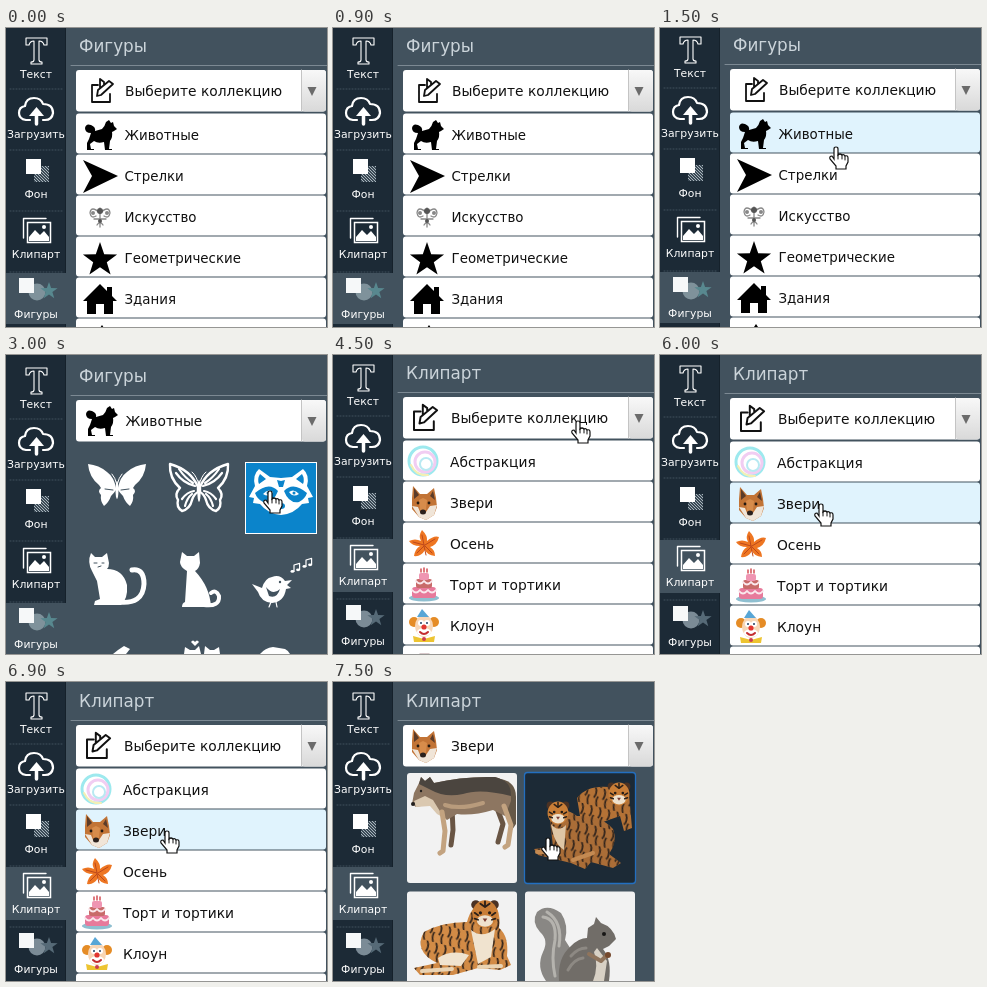
Animation, 321 px wide and 299 px high, one loop 9 s. Source, as an HTML page:

```html
<!DOCTYPE html>
<html lang="ru">
<head>
<meta charset="utf-8">
<title>Фигуры и клипарт</title>
<style>
  html, body { margin: 0; width: 100%; height: 100%; overflow: hidden; background: #42525e; }
  svg { display: block; width: 321px; height: 299px; }
  text { font-family: "DejaVu Sans", Verdana, sans-serif; font-size: 13.8px; fill: #111; }
  .compact { font-size: 13.4px; }
  .tab { font-size: 10.8px; fill: #fff; text-anchor: middle; }
  .title { font-size: 16.8px; fill: #cbd4da; }
</style>
</head>
<body>
<svg id="stage" viewBox="0 0 321 299"></svg>
<script>
const PANEL = '#42525e', SIDE = '#1c2a36', BLUE = '#0b84cb';

const shape = (d, fill = '#000') => `<path d="${d}" fill="${fill}"/>`;
const line = (d, stroke = '#fff', width = 1.5, extra = '') =>
  `<path d="${d}" fill="none" stroke="${stroke}" stroke-width="${width}" stroke-linejoin="round" stroke-linecap="round" ${extra}/>`;
const rect = (x, y, w, h, fill, extra = '') =>
  `<rect x="${x}" y="${y}" width="${w}" height="${h}" fill="${fill}" ${extra}/>`;
const dot = (x, y, r, fill, extra = '') => `<circle cx="${x}" cy="${y}" r="${r}" fill="${fill}" ${extra}/>`;
const oval = (x, y, rx, ry, fill) => `<ellipse cx="${x}" cy="${y}" rx="${rx}" ry="${ry}" fill="${fill}"/>`;
const text = (x, y, s, cls = '') => `<text x="${x}" y="${y}" class="${cls}">${s}</text>`;
const move = (x, y, content, scale = 1) => `<g transform="translate(${x} ${y}) scale(${scale})">${content}</g>`;
const mirror = half => half + `<g transform="scale(-1 1)">${half}</g>`;
const striped = (d, fill) => shape(d, fill) + shape(d, 'url(#stripes)');

function star(cx, cy, r, fill) {
  const points = Array.from({ length: 10 }, (_, i) => {
    const a = i * Math.PI / 5, k = i % 2 ? r * 0.4 : r;
    return `${(cx + k * Math.sin(a)).toFixed(1)},${(cy - k * Math.cos(a)).toFixed(1)}`;
  });
  return `<polygon points="${points.join(' ')}" fill="${fill}"/>`;
}

const defs = `<defs>
  <linearGradient id="button" x2="0" y2="1"><stop stop-color="#f8f8f8"/><stop offset="1" stop-color="#d9d9d9"/></linearGradient>
  <pattern id="hatch" width="3" height="3" patternUnits="userSpaceOnUse">
    <rect width="3" height="3" fill="#3b4a56"/><path d="M0 0L3 3" stroke="#a9b5bd"/></pattern>
  <pattern id="stripes" width="9" height="19" patternUnits="userSpaceOnUse" patternTransform="rotate(14)">
    <path d="M1 0Q5 5 2 11M6 9Q4 14 7 19" fill="none" stroke="#30231b" stroke-width="1.7"/></pattern>
</defs>`;

// Row icons are centred on the origin.
const icons = {
  pick: line('M-4-6H-10V11H8V3M-5 5L-4-1L7-10L11-7L-1 4ZM-2-3V-12L2-9V-6', '#111', 1.8),
  dog: shape('M-9-2Q-15-2-15-7Q-14-12-9-10Q-4-8-5-4L2-6Q5-9 6-13L9-15L11-12L13-13L14-9L17-6L14-4L12-3Q13 2 10 6L9 14H12V15H5L4 7Q-2 9-6 6L-10 9L-9 14H-6V15H-13V8L-11 4Z'),
  arrow: shape('M-17-16L18 0L-17 17L-8 0Z'),
  art: line('M0-9V10M0-4Q-9-12-10-4Q-9 2-4-1M0-4Q9-12 10-4Q9 2 4-1M-3 8Q0 3 3 8M-6 2H6', '#888', 1.3) +
    dot(0, -6, 3, '#555') + dot(-7, -4, 2, '#888') + dot(7, -4, 2, '#888') + dot(0, 4, 2, '#555'),
  star: star(0, 2, 18, '#000'),
  house: shape('M-17 2L0-15L7-8V-12H12V-3L17 2H13V15H4V5H-4V15H-13V2Z'),
  spike: shape('M2-15L6-9H-2Z'),
  rings: dot(-1, -1, 14, '#fff', 'stroke="#9de9ee" stroke-width="3"') +
    dot(1, 0, 10, 'none', 'stroke="#f1cdf2" stroke-width="3"') +
    dot(2, 2, 6, 'none', 'stroke="#b8e9f2" stroke-width="2"') + line('M-13 3Q-8 14 4 13', '#f3efb5', 2),
  fox: shape('M-11-17L-4-9L3-9L10-15L12-5L13 4L10 12L2 17L-5 14L-12 6L-12-5Z', '#c27436') +
    shape('M-10-15L-5-8L-10-4ZM9-12L11-3L6-7Z', '#5b3c2a') +
    shape('M-12 3L-6 4L-4 9L2 9L6 3L13 2L10 12L2 17L-5 14Z', '#f0e5d8') +
    shape('M-5-3L-1-5L3-3L2 7H-4Z', '#d78c4b') + oval(-1, 9, 3, 2.5, '#2b211d') +
    dot(-6, 0, 1.4, '#221912') + dot(5, 0, 1.4, '#221912'),
  leaf: shape('M-2-14Q4-8 3-3Q10-9 15-7Q13 1 6 3Q11 6 11 12Q3 11 1 6Q-3 13-10 12Q-9 5-4 2Q-12 2-15-3Q-9-6-3-3Q-6-8-2-14Z', '#ee7622') +
    line('M0 1L-2-9M1 1L11-5M0 1L-11-2M1 2L8 9M0 2L-7 9M0 2L2 11', '#bd481b', 1),
  cake: oval(0, 13, 15, 3.5, '#8fbfd0') + rect(-12, 2, 24, 11, '#e77a9b', 'rx="3"') +
    rect(-8, -6, 16, 9, '#c86b6a', 'rx="2"') + rect(-5, -12, 10, 7, '#ef95b2', 'rx="2"') +
    line('M-12 5Q-8 10-4 5Q0 10 4 5Q8 10 12 5M-8-4Q-4 1 0-4Q4 1 8-4', '#fae8ed', 2) +
    line('M-3-13V-16M0-13V-17M3-13V-16', '#d44f56', 1.5),
  clown: dot(-10, -4, 5, '#e58c26') + dot(10, -4, 5, '#e58c26') + oval(0, 0, 9, 11, '#f8d6b6') +
    shape('M-7-9L-2-17L5-9Z', '#58a6d6') + dot(-3, -3, 3, '#fff') + dot(3, -3, 3, '#fff') +
    dot(-3, -3, 1, '#203c61') + dot(3, -3, 1, '#203c61') + oval(0, 6, 7, 4, '#fff') +
    line('M-4 6Q0 10 4 6', '#c42d30', 2) + dot(0, 1, 2.6, '#e13632') +
    shape('M-11 10L0 13L11 10L10 16H-10Z', '#edc431') + dot(0, 13, 2, '#cc3e4e'),
  bits: line('M-4-13H5', '#cbb8ba', 1.5),
};

const shapesList = [['dog', 'Животные'], ['arrow', 'Стрелки'], ['art', 'Искусство'],
  ['star', 'Геометрические'], ['house', 'Здания'], ['spike', '']];
const clipartList = [['rings', 'Абстракция'], ['fox', 'Звери'], ['leaf', 'Осень'],
  ['cake', 'Торт и тортики'], ['clown', 'Клоун'], ['bits', '']];

function sidebar(clipart) {
  const [top, height] = clipart ? [184, 53] : [245, 51];
  const [disc, accent] = clipart ? ['#7b8b96', '#566a77'] : ['#7f929b', '#58888f'];
  return rect(0, -5, 60, 315, SIDE) + rect(59, -5, 1, 315, '#15212b') + rect(0, top, 60, height, PANEL) +
    [61, 122, 183, 244].map(y => line(`M4 ${y}H56`, '#41515d', 1, 'stroke-dasharray="1 2"')).join('') +
    line('M20 10H41V17H38Q37 13 33 13V32Q33 34 36 34V36H25V34Q28 34 28 32V13Q24 13 23 17H20Z', '#fff', 1.1) +
    line('M24 92H20Q13 91 13 85Q13 79 19 78Q20 70 28 70Q35 70 37 76Q47 76 47 85Q46 92 39 92H37', '#fff', 2.2) +
    line('M30.5 96V86', '#fff', 3.5) + shape('M23 88L30.5 79L38 88Z', '#fff') +
    rect(28, 138, 15, 16, 'url(#hatch)') + rect(20, 131, 15, 15, '#fff') +
    line('M17.500 210V190.500H40', '#fff', 1.4) + rect(21.5, 194.5, 23, 20, 'none', 'stroke="#fff" stroke-width="1.5"') +
    shape('M23 213V209L29 202L34 207L38 203L43 209V213Z', '#fff') + dot(38, 199, 2, '#fff') +
    dot(31, 264, 8.5, disc) + star(43, 263, 9, accent) + rect(13, 250, 15, 15, '#f6f8f9') +
    ['Текст', 'Загрузить', 'Фон', 'Клипарт', 'Фигуры']
      .map((name, i) => text(30, 50 + i * 60, name, 'tab')).join('');
}

const selectBox = (icon, label, x) =>
  rect(70, 42, 250, 41.5, '#fff', 'rx="3"') + rect(296, 42, 24, 41.5, 'url(#button)', 'rx="3"') +
  line('M295.5 42V83', '#c4c4c4', 1) + shape('M301.5 59H310.5L306 68Z', '#6b6b6b') +
  icon + text(x, 68, label);

const list = (items, hover, iconX, textX, cls) => items.map(([icon, label], i) => {
  const y = 85.5 + i * 41;
  return rect(70, y, 250, 40, i === hover ? '#e0f3fd' : '#fff', 'rx="3"') +
    move(iconX, y + 21.5, icons[icon]) + text(textX, y + 26.5, label, cls);
}).join('');

const hand = (x, y) => move(x, y,
  '<path d="M-2 12V2Q-2 0 0 0Q2 0 2 2V8Q4 6 6 8Q8 7 9 9Q12 8 12 11V15L10 19V22H0V19L-6 12Q-7 9-4 9Z" fill="#fff" stroke="#111" stroke-width="1.2"/>' +
  line('M2 8V12M6 8V12M9 9V13', '#111', 1));

function animalShapes() {
  const cut = d => shape(d, PANEL);
  const smallWing = mirror(shape('M1 3Q3-8 10-13Q18-20 29-21Q28-8 18 0L16 3Q20 6 16 10Q17 16 13 21Q8 17 6 11Q3 8 1 5Z', '#fff') +
    line('M4 5L12 4', PANEL, 1) + line('M0 0Q2-8 5-11', '#fff', 1));
  const largeWing = mirror(
    line('M1 1Q8-16 29-22Q30-8 19 2Q25 8 21 14Q23 21 17 25Q9 23 7 14Q5 8 1 6Z', '#fff', 2.4) +
    line('M4 0Q16-3 23-13M6-3Q14-8 20-17M5 5Q12 6 17 13M7 8Q12 12 14 20', '#fff', 2.2) +
    line('M0 0Q2-10 7-14', '#fff', 1));
  const raccoon = mirror(shape('M0-12L11-13L22-21Q29-15 26-4L32 7L27 8L28 13L21 14Q13 24 0 25Z', '#fff') +
    shape('M15-11L21-16Q24-11 22-6ZM3 1Q12-9 26 3Q24 9 18 12Q8 14 3 1ZM0-9L4-10L2-3H0Z', BLUE) +
    shape('M8 2Q13-2 18 4Q12 8 8 2Z', '#fff') + dot(13, 3, 1.5, BLUE)) + oval(0, 16, 4, 3, BLUE);
  const note = line('M0 8V0L7-2V6', '#fff', 1.5) + oval(-2, 8, 2.4, 1.7, '#fff') + oval(5, 6, 2.4, 1.7, '#fff');
  return move(111, 130, smallWing + oval(0, 5, 1.5, 9, '#fff')) +
    move(193, 131, largeWing + oval(0, 5, 1.7, 11, '#fff')) +
    rect(239.5, 107.5, 71, 71, BLUE, 'stroke="#fff"') + move(275, 135, raccoon) +
    shape('M85 198L89 202H96L101 198L103 208Q103 212 101 214Q117 214 121 230Q122 244 115 250H88L89 246L94 244L91 226L86 216Q81 207 85 198Z', '#fff') +
    line('M112 247Q137 250 138 229Q138 213 126 215', '#fff', 5) +
    line('M88 208H91M96 208H98M92 212L95 211', PANEL, 1) +
    shape('M176 197L181 201H188L193 197L194 208Q193 214 189 216Q204 232 205 252H176Q176 248 179 247L181 216Q174 212 174 207Z', '#fff') +
    line('M198 250Q214 252 213 241Q210 234 205 238', '#fff', 4) +
    shape('M246 229L256 233Q259 223 266 222Q274 219 279 226L286 225L281 230L285 233L280 234Q278 247 266 248Q255 247 252 237Z', '#fff') +
    cut('M260 232Q267 241 274 234Q271 244 263 241Z') + dot(274, 227, 1.2, PANEL) +
    line('M265 247L263 252M270 247L271 252', '#fff', 1.2) +
    move(288, 210, note, 0.8) + move(300, 205, note, 0.8) +
    shape('M107 299L112 295L118 291L124 294L120 299Z', '#fff') +
    shape('M178 299L179 292L184 295H189L193 291L195 299ZM198 299L199 291L204 295H208L213 292L214 299Z', '#fff') +
    shape('M189 291L185 287Q187 284 189 287Q191 284 193 287Z', '#fff') +
    shape('M254 299Q259 293 267 292L279 294Q283 296 284 299Z', '#fff');
}

function wolf() {
  return line('M119 126L120 148L118 163M164 126L170 142L165 160', '#695544', 5) +
    shape('M168 97Q183 100 183 115V142L179 148L174 128Z', '#655848') +
    shape('M79 122L81 111L86 101L88 95L92 99L97 95L101 101Q130 94 162 95Q179 99 178 119L172 134L160 128Q140 134 124 132L114 138L104 130L98 122L83 125Z', '#8d7661') +
    shape('M86 102L88 95L92 99L97 95L101 101Q130 94 162 95Q179 99 178 114Q147 106 130 112Q112 116 98 108Z', '#4b453f') +
    shape('M81 119L92 114L100 118L108 131L113 137L104 132L97 124L83 125Z', '#dac8b0') +
    line('M109 130L112 149L110 169L107 171M171 124L178 143L175 163L172 165', '#c3a380', 5) +
    line('M112 123Q127 128 150 121', '#b89b7c', 4) + dot(80, 122, 2, '#221f1e') + dot(88, 109, 1.2, '#221f1e');
}

const tigerFace = (x, y, scale) => move(x, y,
  dot(-8, -8, 4, '#4b3224') + dot(8, -8, 4, '#4b3224') + oval(0, 0, 11, 12, '#c97e37') +
  oval(0, 6, 7, 5, '#eee1cd') + line('M-4-9L0-6L4-9M-9-1L-6 1M9-1L6 1M0-11V-8M-9 4L-6 5M9 4L6 5', '#2b2019', 1.6) +
  dot(-4, -1, 1.4, '#241c16') + dot(4, -1, 1.4, '#241c16') + shape('M-2 4H2L0 7Z', '#7c3c31'), scale);

function tigerPair() {
  return striped('M244 116Q254 103 276 105L296 112L299 146L291 149L287 134L270 140L247 134Z', '#b47236') +
    tigerFace(286, 112, 0.95) +
    striped('M217 138Q228 122 244 134Q268 133 280 147Q285 159 276 172L288 181L280 186L258 180L252 187L238 181L205 173L201 167L220 165Z', '#aa6d37') +
    shape('M218 142Q225 151 233 143L231 168Q221 162 218 142Z', '#dfc6a5') + tigerFace(225, 131, 0.95) +
    line('M240 178L260 171M204 170L222 170', '#c48a52', 4);
}

function lyingTiger() {
  return striped('M91 250Q109 240 134 240Q139 221 154 219Q169 223 166 246Q176 254 174 274L178 283L167 288L145 286L120 293H87L81 286L104 281Q80 269 91 250Z', '#d28b46') +
    shape('M138 248Q149 257 162 247L158 275L145 282ZM105 276Q119 267 136 273L128 284L107 283Z', '#f0e3cf') +
    tigerFace(152, 232, 1.15) + line('M89 289L119 287M146 285L168 284', '#e9d3b3', 4);
}

function squirrel() {
  return shape('M243 299H213Q203 285 210 270Q216 258 207 250Q198 240 204 230Q214 221 228 231Q236 243 232 258L246 280Z', '#898784') +
    line('M210 235Q224 237 222 258Q218 276 222 294M214 230Q230 240 226 264', '#b5b3ae', 3) +
    shape('M226 299Q224 276 238 264Q246 256 254 256L255 246L261 242L263 235L268 241Q280 245 283 257L276 264L270 267Q279 278 276 299Z', '#716d68') +
    line('M238 274Q245 266 253 266M235 288Q241 277 250 276', '#8d8983', 3) +
    shape('M264 266L274 279L271 299H260Q266 284 261 270Z', '#d8d1c5') +
    line('M256 272L268 279L274 273', '#8f745c', 4) + dot(271, 252, 2, '#171615') + dot(275, 273, 3, '#75492d');
}

const photos = () =>
  rect(74, 91, 110, 110, '#f2f2f2', 'rx="3"') + wolf() +
  rect(191.5, 90.5, 111, 111, SIDE, 'rx="3" stroke="#236fc0" stroke-width="1.3"') + tigerPair() +
  rect(74, 209.5, 110, 100, '#f2f2f2', 'rx="3"') + lyingTiger() +
  rect(192, 209.5, 110, 100, '#f2f2f2', 'rx="3"') + squirrel();

const prompt = 'Выберите коллекцию';
const pickShapes = selectBox(move(96, 63, icons.pick), prompt, 119);
const pickClipart = selectBox(move(92, 63, icons.pick, 1.1), prompt, 118);
const shapeRows = hover => pickShapes + list(shapesList, hover, 94, 118.5, 'compact');
const clipartRows = hover => pickClipart + list(clipartList, hover, 91, 117, '');

const scenes = [
  { shift: 0, body: shapeRows(-1) },
  { shift: -1, body: shapeRows(0), cursor: [176, 119] },
  { shift: 3, body: selectBox(move(95, 63, icons.dog), 'Животные', 119.5), gallery: animalShapes(), cursor: [264, 136] },
  { shift: 0, clipart: true, body: clipartRows(-1), cursor: [245, 66] },
  { shift: 1, clipart: true, body: clipartRows(1), cursor: [161, 149] },
  { shift: 1, clipart: true, body: selectBox(move(91, 63, icons.fox), 'Звери', 118), gallery: photos(), cursor: [215, 156] },
].map(({ shift, clipart, body, gallery = '', cursor }) =>
  defs + rect(0, 0, 321, 299, PANEL) +
  move(0, shift, sidebar(clipart) +
    text(73, 24, clipart ? 'Клипарт' : 'Фигуры', 'title') +
    line('M65 37.5H321', '#7c8993', 1) + body) +
  gallery + (cursor ? hand(...cursor) : ''));

const stage = document.getElementById('stage');
let shown = -1;
function tick() {
  const index = Math.floor(performance.now() % 9000 / 1500);
  if (index !== shown) stage.innerHTML = scenes[shown = index];
  requestAnimationFrame(tick);
}
tick();
</script>
</body>
</html>
```
